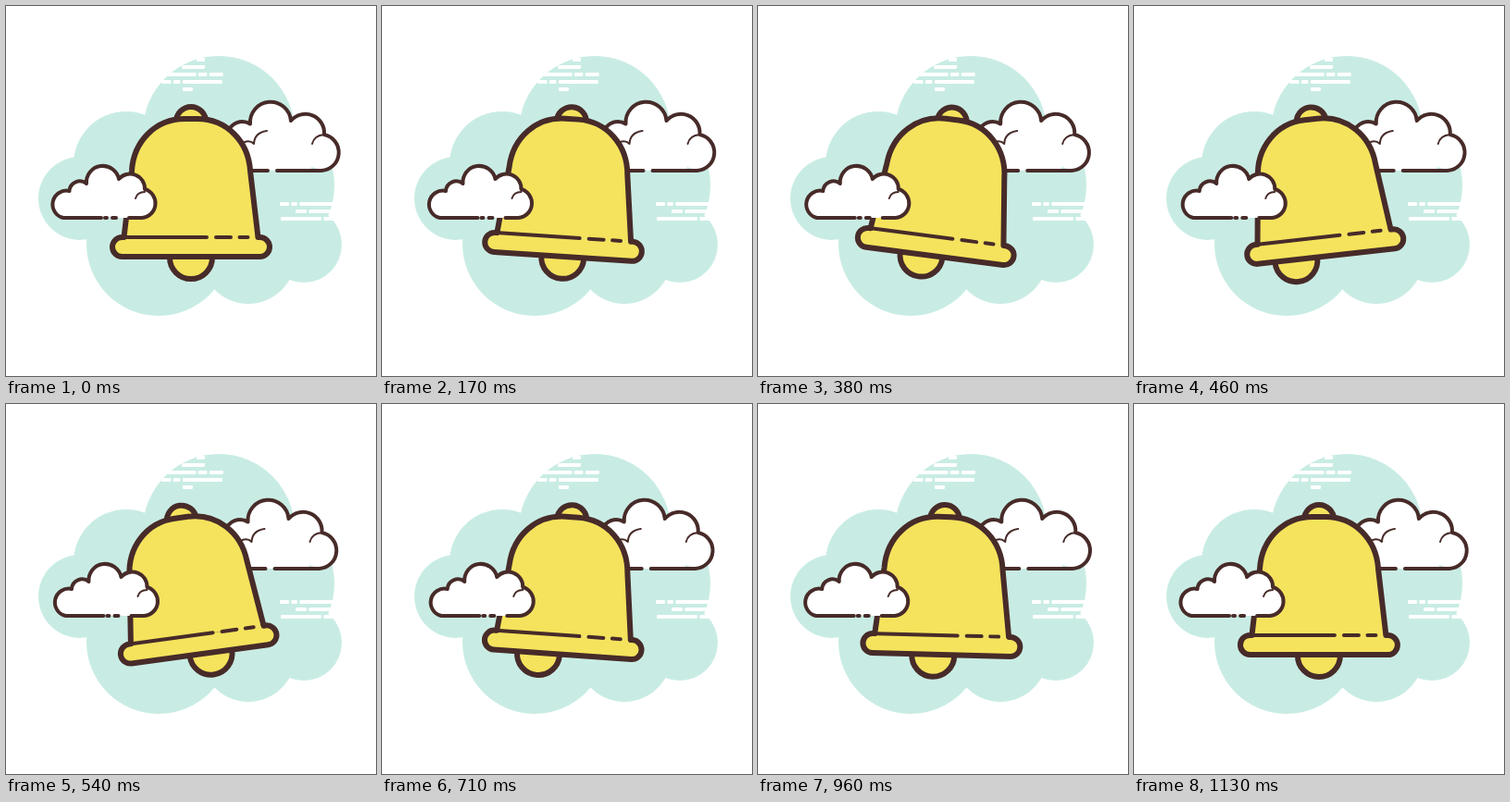
An HTML page with a canvas that plays this animation: 400x400 px, repeating every 1180 ms.

```html
<!DOCTYPE html>
<html lang="en">
<head>
<meta charset="utf-8">
<title>Ringing bell</title>
<style>
html, body { margin: 0; width: 100%; height: 100%; overflow: hidden; background: #fff; }
canvas { display: block; width: 400px; height: 400px; }
</style>
</head>
<body>
<canvas id="stage"></canvas>
<script>
const LOOP = 1180, STEPS = 28;
const INK = '#472b29', YELLOW = '#f5e35d', MINT = '#c8ece4', WHITE = '#fff';

const canvas = document.getElementById('stage');
const ctx = canvas.getContext('2d');
const dpr = window.devicePixelRatio || 1;
canvas.width = canvas.height = 400 * dpr;

function disc(x, y, r) {
  const p = new Path2D();
  p.arc(x, y, r, 0, Math.PI * 2);
  return p;
}

// A chain of lobes; each radius is a share of its chord, 0.5 being a half circle
function cloud([x, y], lobes, base, folds) {
  let d = `M${x} ${y}`;
  for (const [nx, ny, share = 0.5] of lobes) {
    const r = share * Math.hypot(nx - x, ny - y);
    d += `A${r} ${r} 0 0 1 ${nx} ${ny}`;
    [x, y] = [nx, ny];
  }
  return { fill: new Path2D(d), edge: new Path2D(d + base), folds: new Path2D(folds) };
}

const rightCloud = cloud([240, 137],
  [[264, 127.5, 0.62], [308, 124], [344, 139, 0.525], [341, 178, 0.504]],
  'H293M283 178H245', 'M268 149Q268.5 137 282 135M258 147Q264 145 268 149M331 149Q333 140 344 139');
rightCloud.fill.rect(240, 137, 90, 41);

const leftCloud = cloud([62, 229],
  [[68.5, 200], [87, 192, 0.56], [122, 187, 0.501], [150, 198, 0.53], [147, 229, 0.508]],
  'H133M103 229H62M107 229H109M115 229H119', 'M140 208Q142 201 150 201');

const body = new Path2D('M127.5 250L136 178C138 146 162 122 193 122H207C238 122 262 146 264 178L272.5 250');
const slab = new Path2D('M127.5 250H125.5A10.5 10.5 0 0 0 125.5 271H274.5A10.5 10.5 0 0 0 274.5 250H272.5');
const trim = new Path2D('M130 250H217M227 250H243M252.5 250H261.5');

// Turning points as [step, value], eased in between
const swing = [[0, 0], [8.5, 8.3], [12, -9.8], [16, 4.1], [28, 0]];
const clapper = [[7.4, 0], [10.9, -33], [14.3, 33], [16.9, -26], [27, 0]];

function track(keys, s) {
  const n = keys.findIndex(k => k[0] >= s);
  if (n < 1) return 0;
  const [s0, a] = keys[n - 1], [s1, b] = keys[n];
  return a + (b - a) * (1 - Math.cos(Math.PI * (s - s0) / (s1 - s0))) / 2;
}

function stroke(path, width) {
  ctx.lineWidth = width;
  ctx.strokeStyle = INK;
  ctx.stroke(path);
}

function shape(path) {
  ctx.fillStyle = YELLOW;
  ctx.fill(path);
  stroke(path, 6);
}

// Bars of the given lengths, set side by side
function streak(x, y, ...lengths) {
  for (const w of lengths) {
    ctx.beginPath();
    ctx.roundRect(x, y - 2, w, 4, 1.2);
    ctx.fill();
    x += w + 2.4;
  }
}

function drawSky() {
  ctx.fillStyle = MINT;
  ctx.fill(disc(230, 136, 82));
  ctx.fill(disc(130, 171, 57));
  ctx.fill(disc(80, 208, 45));
  ctx.fill(disc(165, 257, 78));
  ctx.fill(disc(262, 271, 51));
  ctx.fill(disc(322, 258, 41));
  ctx.fill(disc(273, 194, 82));
  ctx.fillRect(120, 150, 190, 130);

  ctx.fillStyle = WHITE;
  streak(206, 58, 9);
  streak(190, 66, 25);
  streak(168, 74, 37.5, 9.5, 15);
  streak(168, 82, 10.5, 7.5, 43);
  streak(191, 90, 11);
  streak(296, 214, 10, 6.5, 38);
  streak(313, 222, 12, 26);
  streak(297, 230, 44, 10);
}

function drawCloud({ fill, edge, folds }, dx) {
  ctx.save();
  ctx.translate(dx, 0);
  ctx.fillStyle = WHITE;
  ctx.fill(fill);
  stroke(edge, 4);
  stroke(folds, 2);
  ctx.restore();
}

function drawBell(angle, slide) {
  ctx.save();
  ctx.translate(200, 200);
  ctx.rotate(angle * Math.PI / 180);
  ctx.translate(-200, -200);
  shape(disc(200, 125, 16));
  shape(disc(200 + slide, 272, 23));
  shape(body);
  shape(slab);
  stroke(trim, 4);
  ctx.restore();
}

function draw(ms) {
  // 24 poses per second, held on a 10 ms clock
  const t = Math.floor(ms % LOOP / 10) * 10;
  const s = Math.min(STEPS - 1, Math.floor((t + 4.9) * 0.024));
  const drift = 1.25 * (1 - Math.cos(2 * Math.PI * s / STEPS));

  ctx.setTransform(dpr, 0, 0, dpr, 0, 0);
  ctx.fillStyle = WHITE;
  ctx.fillRect(0, 0, 400, 400);
  ctx.lineCap = ctx.lineJoin = 'round';
  drawSky();
  drawCloud(rightCloud, -drift);
  drawBell(track(swing, s), track(clapper, s));
  drawCloud(leftCloud, drift);
}

let start;
function tick(now) {
  start ??= now;
  draw(Math.max(0, now - start));
  requestAnimationFrame(tick);
}
draw(0);
requestAnimationFrame(tick);
</script>
</body>
</html>
```
